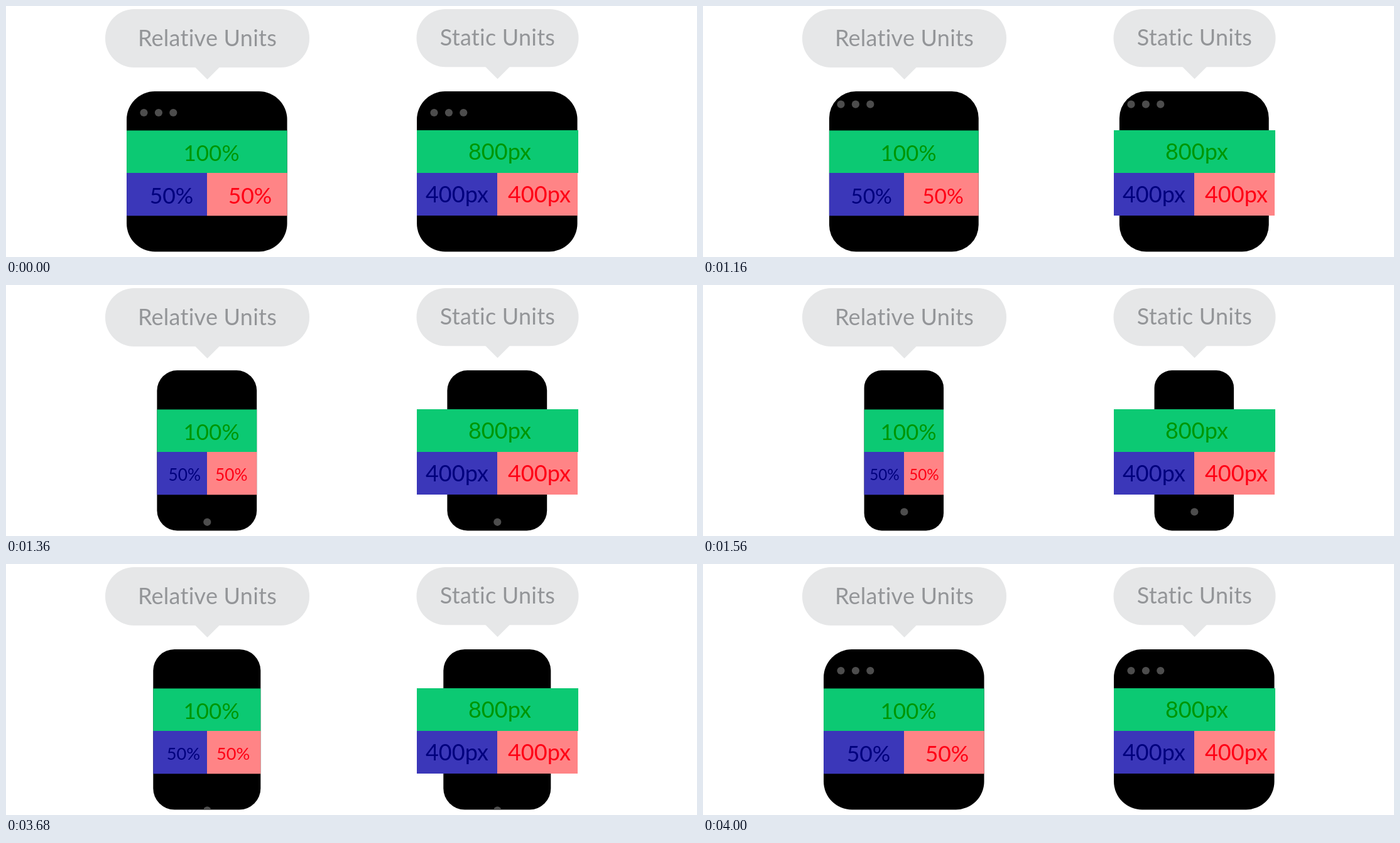
An HTML page with a canvas that plays this animation: 1100x400 px, repeating every 5040 ms.

```html
<!DOCTYPE html>
<html lang="en">
<head>
<meta charset="utf-8">
<title>Relative and static units</title>
<style>
html, body { margin: 0; height: 100%; overflow: hidden; background: #fff; }
canvas { display: block; }
</style>
</head>
<body>
<canvas id="stage" width="1100" height="400"></canvas>
<script>
const ctx = document.getElementById('stage').getContext('2d');
const LOOP = 5040, STEP = 40, MOVE = 520, BACK = 2440;
const GREEN = '#0cc973', BLUE = '#3b37b9', PINK = '#ff8486', GREY = '#4d4d4d';
const GREEN_INK = '#009600', BLUE_INK = '#00007e', RED_INK = '#ff0015';

const mix = (a, b, p) => a + (b - a) * p;
const ease = x => x < .5 ? 2 * x * x : 1 - 2 * (1 - x) * (1 - x);
const ramp = (t, start) => ease(Math.min(1, Math.max(0, (t - start) / MOVE)));
// 0 = wide window, 1 = phone
const phase = (t, start) => ramp(t, start) - ramp(t, start + BACK);

function rect(x, y, w, h, color) {
  ctx.fillStyle = color;
  ctx.fillRect(x, y, w, h);
}

function dot(x, y) {
  ctx.fillStyle = GREY;
  ctx.beginPath();
  ctx.arc(x, y, 6.1, 0, 7);
  ctx.fill();
}

function label(text, x, baseline, size, color, spacing = 0) {
  ctx.font = size + 'px Lato, sans-serif';
  ctx.letterSpacing = spacing + 'px';
  ctx.textAlign = 'center';
  ctx.fillStyle = color;
  ctx.fillText(text, x, baseline);
}

function bubble(text, cx, w, bottom) {
  ctx.fillStyle = '#e6e7e8';
  ctx.beginPath();
  ctx.roundRect(cx - w / 2, 5, w, bottom - 5, 46);
  ctx.fill();
  ctx.beginPath();
  ctx.moveTo(cx - 20, bottom - 1);
  ctx.lineTo(cx + 20, bottom - 1);
  ctx.lineTo(cx, bottom + 19);
  ctx.fill();
  label(text, cx, bottom - 34, 36, '#939598', .25);
}

function device(cx, w, p, slide) {
  ctx.save();
  ctx.beginPath();
  ctx.roundRect(cx - w / 2, 136, w, 255.5, mix(45, 28, p));
  ctx.fillStyle = '#000';
  ctx.fill();
  ctx.clip();
  for (const dx of [-100.3, -76.9, -53.5]) dot(cx + dx, 170 - 78 * slide);
  dot(cx + .5, 361.5 + 78 * (1 - slide));
  ctx.restore();
}

function draw(t) {
  const p = phase(t, 1024), slide = phase(t, 1008);
  const shrink = p * (1 + .36 * (1 - p));
  const w = mix(255.5, 126.5, p), left = 319.8 - w / 2;

  rect(0, 0, 1100, 400, '#fff');
  bubble('Relative Units', 320.5, 325, 98);
  bubble('Static Units', 782.5, 258, 97.3);
  device(319.8, w, p, slide);
  device(781.8, w, p, slide);

  rect(left, 198.4, w, 67.8, GREEN);
  rect(left, 266, 320 - left, 68.3, BLUE);
  rect(320, 266, left + w - 320, 68.3, PINK);
  const size = mix(35.5, 24.2, shrink), base = 302.5 + size * .36;
  label('100%', 327, 246.5, 35, GREEN_INK);
  label('50%', mix(263.5, 289, shrink), base, size, BLUE_INK);
  label('50%', mix(388.5, 352, shrink), base, size, RED_INK);

  rect(654, 198, 257, 68, GREEN);
  rect(654, 266, 128, 68, BLUE);
  rect(782, 266, 128, 68, PINK);
  label('800px', 786, 244.5, 36, GREEN_INK);
  label('400px', 718, 312.5, 36, BLUE_INK);
  label('400px', 849, 312.5, 36, RED_INK);
}

const begin = performance.now();
function tick() {
  const t = (performance.now() - begin) % LOOP;
  draw(Math.floor(t / STEP) * STEP);
  requestAnimationFrame(tick);
}
tick();
</script>
</body>
</html>
```
